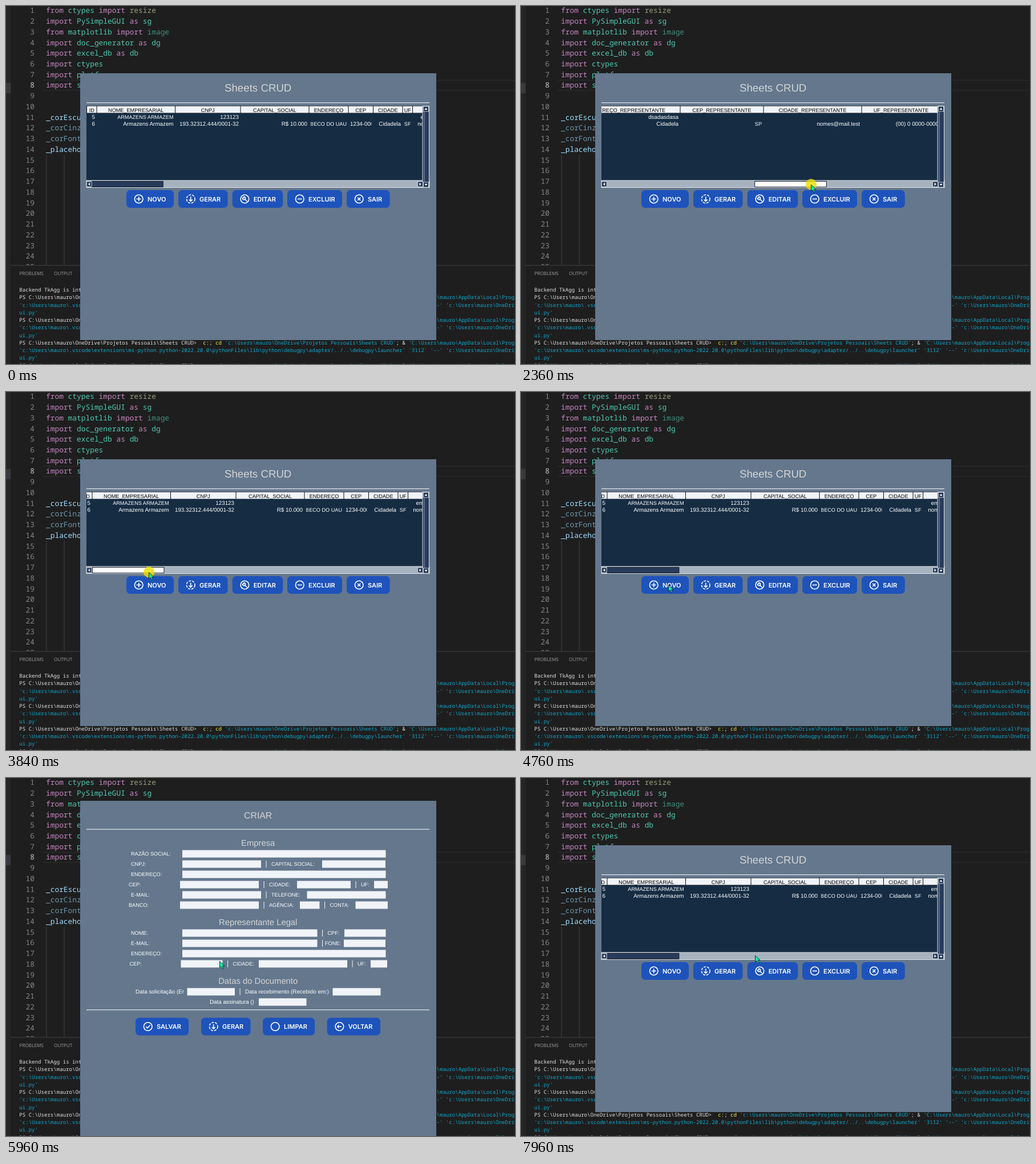
Write an HTML page that moves like this. It is 892x628 px and loops after 8 s.

```html
<!DOCTYPE html>
<html lang="pt">
<head>
<meta charset="utf-8">
<style>
html, body { margin: 0; width: 100%; height: 100%; overflow: hidden; background: #1e1e1e; }
svg { display: block; }
text { white-space: pre; text-rendering: geometricPrecision; }
.code { font: 12.87px "Noto Sans Mono", monospace; }
.term { font: 9.11px "Noto Sans Mono", monospace; fill: #e0e0e0; }
.tab { font: 8.2px "Open Sans", sans-serif; fill: #a0a0a0; }
.ui { font-family: "Liberation Sans", Arial, sans-serif; }
.btn { font: 600 11px Inter, sans-serif; fill: #fff; }
.icon { fill: none; stroke: #fff; stroke-width: 1.6; }
</style>
</head>
<body>
<svg id="stage" width="892" height="628" viewBox="0 0 892 628"></svg>
<script>
const LOOP = 8000, NAVY = '#283b5b', PANEL = '#64778d', PAPER = '#f0f3f8', RULE = '#dce0e4';
const PER_THUMB_PX = 4.68;

const rect = (x, y, w, h, fill, more = '') =>
  `<rect x="${x}" y="${y}" width="${w}" height="${h}" fill="${fill}" ${more}/>`;
const text = (x, y, s, more = '') => `<text x="${x}" y="${y}" ${more}>${s}</text>`;
const span = (color, s) => `<tspan fill="${color}">${s}</tspan>`;
const label = (x, y, s, fill = '#fff', anchor = 'start') =>
  text(x, y, s, `class="ui" fill="${fill}" text-anchor="${anchor}"
    font-size="${/[A-Z]{2}/.test(s) ? 9.15 : 9.8}"`);
const heading = (y, s, size) =>
  text(441.7, y, s, `class="ui" fill="#d4d4d4" font-size="${size}" text-anchor="middle"`);
const rule = y => rect(141, y, 601, 1.3, RULE);

// Editor and terminal behind the window
function editor() {
  const key = s => span('#c586c0', s), mod = s => span('#4ec9b0', s);
  const lines = [
    `${key('from')} ${mod('ctypes')} ${key('import')} ${span('#9d9d7e', 'resize')}`,
    `${key('import')} ${mod('PySimpleGUI')} ${key('as')} ${mod('sg')}`,
    `${key('from')} ${mod('matplotlib')} ${key('import')} ${span('#3e9080', 'image')}`,
    `${key('import')} ${mod('doc_generator')} ${key('as')} ${mod('dg')}`,
    `${key('import')} ${mod('excel_db')} ${key('as')} ${mod('db')}`,
    ...['ctypes', 'platform', 'sys'].map(m => `${key('import')} ${mod(m)}`),
    '', '',
    span('#9cdcfe', '_corEscura'), span('#6d96ab', '_corCinza'),
    span('#6d96ab', '_corFonte'), span('#9cdcfe', '_placeholder'),
  ];
  let out = rect(0, 0, 8, 628, '#252526') + rect(0, 135, 8, 18, '#3a3a3e') +
    rect(64, 129.5, 828, 1.3, '#2b2b2b') + rect(64, 147.5, 828, 1.3, '#2b2b2b') +
    rect(70.5, 261, 1, 194, '#404040') + rect(101.5, 261, 1, 194, '#404040');
  for (let i = 0; i < 25; i++) {
    const y = 12.3 + i * 18.74;
    out += text(50, y, i + 1, `class="code" text-anchor="end" fill="${i == 7 ? '#c6c6c6' : '#858585'}"`);
    if (lines[i]) out += text(70, y, lines[i], 'class="code"');
  }
  return out;
}

function terminal() {
  const blue = s => span('#11a8cd', s), yellow = s => span('#f0f04a', s);
  const home = String.raw`:\Users\mauro`, project = String.raw`${home}\OneDrive\Projetos Pessoais\Sheets CRUD`;
  const command = [
    `PS C${project}&gt;  ${yellow('c:')}; ${yellow('cd')} ${blue(`'c${project}'`)}; &amp; ` +
      blue(String.raw`'C${home}\AppData\Local\Programs'`),
    blue(String.raw`'c${home}\.vscode\extensions\ms-python.python-2022.20.0\pythonFiles\lib\python\debugpy\adapter/../..\debugpy\launcher' '3112' '--' 'c${home}\OneDrive`),
    blue("ui.py'"),
  ];
  const lines = ['Backend TkAgg is interactive', ...command, ...command, ...command, command[0]];
  return rect(8, 454.5, 884, 174, '#1e1e1e') + rect(8, 454.5, 884, 1, '#434343') +
    text(23.5, 472, 'PROBLEMS', 'class="tab"') + text(84, 472, 'OUTPUT', 'class="tab"') +
    lines.map((s, i) => text(23.3, 501.2 + i * 13.25, s, 'class="term"')).join('');
}

// Buttons
const icons = {
  NOVO: 'M-4 0H4M0-4V4',
  GERAR: 'M0-4V4M-3 1L0 4 3 1',
  EDITAR: 'M4 4L-.5-.5M-4-1.5A2.6 2.6 0 1 0-1.5-4L-2-2z',
  EXCLUIR: 'M-4 0H4',
  SAIR: 'M-2.5-2.5L2.5 2.5M-2.5 2.5L2.5-2.5',
  SALVAR: 'M-3.5 0L-1 2.5 4-2.5',
  LIMPAR: '',
  VOLTAR: 'M3.5 0H-3.5M-1-2.5L-3.5 0-1 2.5',
};
const button = (x, y, w, name) => `<g id="${name}${y}">` +
  rect(x, y, w, 31, '#1e53bb', 'rx="6.5"') +
  `<g class="icon" transform="translate(${x + 21.7} ${y + 15.5})">
    <circle r="7.3" ${name == 'GERAR' ? 'stroke-dasharray="4.2 1.9"' : ''}/><path d="${icons[name]}"/></g>` +
  text(x + 37, y + 19.6, name, 'class="btn"') + '</g>';

// List window: columns are [title, width, first row, second row]
const columns = [
  ['ID', 17.5, '5', '6'],
  ['NOME_EMPRESARIAL', 137.5, 'ARMAZENS ARMAZEM', 'Armazens Armazem'],
  ['CNPJ', 114.5, '123123', '193.32312.444/0001-32'],
  ['CAPITAL_SOCIAL', 120, '', 'R$ 10.000'],
  ['ENDEREÇO', 69, '', 'BECO DO UAU'],
  ['CEP', 43.5, '', '1234-000'],
  ['CIDADE', 51.5, '', 'Cidadela'],
  ['UF', 17.5, '', 'SF'],
  ['E-MAIL', 87.5, 'emite@mail.test', 'nomes@mail.test'],
  ['TELEFONE', 92, '', '(00) 0 0000-0000'],
  ['BANCO', 60, '', '123'],
  ['AGENCIA', 65, '', '1234'],
  ['CONTA', 55, '', '12345-6'],
  ['REPRESENTANTE', 130, '', 'Representante'],
  ['CPF', 106, '', '123.123.123-12'],
  ['ENDEREÇO_REPRESENTANTE', 188, 'dsadasdasa', 'Cidadela'],
  ['CEP_REPRESENTANTE', 146, '', 'SP'],
  ['CIDADE_REPRESENTANTE', 172, '', 'nomes@mail.test'],
  ['UF_REPRESENTANTE', 138, '', '(00) 0 0000-0000'],
  ['EMAIL_REPRESENTANTE', 158, '', ''],
  ['FONE_REPRESENTANTE', 156, '', ''],
  ['DATA_SOLICITACAO', 140, '', ''],
  ['DATA_RECEBIMENTO', 140, '', ''],
  ['DATA_ASSINATURA', 140, '', ''],
  ['ARQUIVO', 140, '', ''],
];

function table() {
  let x = .5, out = rect(0, 0, 2690, 13, '#0a0f16');
  for (const [title, w, ...rows] of columns) {
    out += rect(x + .5, .7, w - 1, 11.8, PAPER) + label(x + w / 2, 10.5, title, '#000', 'middle');
    rows.forEach((s, i) => {
      const inner = w - 6, fits = s.length * 5 < inner;
      out += `<svg x="${x + 3}" y="${13 + i * 11.7}" width="${inner}" height="13">` +
        label(fits ? inner : 0, 10.3, s, '#fff', fits ? 'end' : 'start') + '</svg>';
    });
    x += w;
  }
  return `<svg x="141" y="175" width="590" height="131">${rect(0, 0, 590, 131, '#152c43')}<g id="rows">${out}</g></svg>`;
}

const arrowBox = (x, y, turn) => `<g transform="translate(${x} ${y}) rotate(${turn})">` +
  rect(-4.5, -4.5, 9, 9, NAVY, `stroke="${RULE}" stroke-width=".8"`) + '<path d="M-2.5 1.5L0-1.8 2.5 1.5z" fill="#fff"/></g>';

const listWindow = () => rect(130, 118, 624, 468, PANEL) + heading(150, 'Sheets CRUD', 18.7) + rule(169) + table() +
  rect(141, 306, 601, 12.5, '#a6b2be', `stroke="${RULE}"`) +
  rect(730, 175.5, 11.5, 143, NAVY, `stroke="${RULE}"`) + rect(732.5, 186, 1, 122, '#8d9bb0') +
  '<rect id="thumb" y="307.5" width="125.5" height="10" stroke="#111a28"/>' +
  arrowBox(145.7, 312.5, -90) + arrowBox(726, 312.5, 90) + arrowBox(736, 180.5, 0) + arrowBox(736, 313.5, 180) +
  button(211, 323, 83, 'NOVO') + button(302, 323, 86.5, 'GERAR') + button(396.7, 323, 88.5, 'EDITAR') +
  button(493, 323, 96, 'EXCLUIR') + button(597, 323, 75.7, 'SAIR');

// Form rows: centre y, first x, then label, field left, field right
const formRows = [
  [133, 219, 'RAZÃO SOCIAL:', 309, 665.5],
  [151, 219, 'CNPJ:', 309, 447, 'CAPITAL SOCIAL:', 554, 665],
  [169, 219, 'ENDEREÇO:', 309, 665.5],
  [187, 215, 'CEP:', 305, 443, 'CIDADE:', 510, 604, 'UF:', 645, 669],
  [205, 219, 'E-MAIL:', 309, 447, 'TELEFONE:', 527.5, 665.5],
  [223, 215, 'BANCO:', 305, 443, 'AGÊNCIA:', 515, 549.5, 'CONTA:', 612.5, 669],
  [272, 219, 'NOME:', 309, 545.5, 'CPF:', 593, 665.5],
  [290, 219, 'E-MAIL:', 309, 545.5, '', 592, 665],
  [308, 219, 'ENDEREÇO:', 309, 665.5],
  [326, 216.5, 'CEP:', 306.5, 379.5, 'CIDADE:', 443, 598, 'UF:', 639, 668],
  [375, 227, 'Data solicitação (Er', 317.5, 401, 'Data recebimento (Recebido em:)', 572.5, 656.5],
  [393, 357, 'Data assinatura ()', 443, 526.5],
];

function formRow([y, x, ...cells]) {
  let out = '';
  for (let i = 0; i < cells.length; i += 3) {
    const [name, left, right] = cells.slice(i, i + 3);
    if (i) out += rect(x - 9.5, y - 6, 1.1, 12, '#e8ebee');
    out += label(x, y + 3.4, name) + rect(left, y - 6.5, right - left, 13, PAPER);
    x = right + 18;
  }
  return out;
}

const formWindow = () => rect(130, 40, 624, 588, PANEL) + heading(71, 'CRIAR', 15.8) + rule(89.3) +
  heading(118.7, 'Empresa', 14.8) + heading(257.7, 'Representante Legal', 14.8) +
  heading(360.5, 'Datas do Documento', 14.8) + formRows.map(formRow).join('') + label(559, 293.4, 'FONE:') + rule(406) +
  button(227, 420.5, 93, 'SALVAR') + button(342, 420.5, 86.5, 'GERAR') +
  button(450, 420.5, 91, 'LIMPAR') + button(562.7, 420.5, 93.3, 'VOLTAR');

stage.innerHTML = editor() + terminal() +
  `<g id="list">${listWindow()}</g><g id="form">${formWindow()}</g>
  <g id="pointer"><circle id="halo" cx=".5" r="9.7" fill="#e8de00"/>
  <path d="M.5.5V12L3.2 9.6 5.2 13.8 7.3 12.8 5.4 8.8H9.2z" fill="#12f0a6" stroke="#10242c" stroke-width=".9"/></g>`;

// The picture updates in bursts: [start, count], 120 ms apart
const ticks = [[0, 1], [400, 3], [800, 3], [1200, 2], [1600, 3], [2000, 4], [2760, 1], [2920, 2], [3200, 3], [3720, 3],
  [4120, 3], [4640, 2], [4920, 1], [5200, 4], [5720, 3], [6120, 3], [6520, 2], [7160, 1], [7320, 1], [7560, 1], [7720, 3]]
  .flatMap(([start, n]) => Array.from({ length: n }, (_, i) => start + i * 120));

// Pointer path: time, x, y, thumb offset
const path = [
  [400, 749, 598, 0], [640, 343, 414, 0], [1040, 247, 322, 0], [1200, 249, 318, 0], [1320, 251, 314, 0],
  [1720, 251, 314, 0], [1840, 272, 314, 22], [2360, 508, 313, 260], [2760, 500, 317, 250], [2920, 470, 319, 220],
  [3440, 300, 318, 50], [3720, 256, 316, 6], [3840, 250, 316, 1.7], [3960, 250, 316, 1.7], [4360, 258, 338, 1.7],
  [4920, 258, 338, 1.7], [5320, 292, 352, 1.7], [5560, 314, 342, 1.7], [5840, 355, 315, 1.7], [5960, 374, 321, 1.7],
  [6360, 560, 415, 1.7], [6640, 589, 431, 1.7], [7320, 589, 431, 1.7], [7560, 573, 416, 1.7], [7960, 410, 311, 1.7],
];
const presses = [[1600, 4120, .8], [4640, 4760, .62], [7160, 7320, .62]];

function poseAt(t) {
  const i = Math.max(1, path.findIndex(p => p[0] >= t)), a = path[i - 1], b = path[i];
  const k = Math.max(0, (t - a[0]) / (b[0] - a[0]));
  return a.map((v, j) => v + (b[j] - v) * k).slice(1);
}

const byId = id => document.getElementById(id);
const set = (id, name, value) => byId(id).setAttribute(name, value);
const show = (id, on) => { byId(id).style.display = on ? '' : 'none'; };

function draw(now) {
  const t = ticks.findLast(k => k <= now % LOOP);
  const [x, y, offset] = poseAt(t);
  const press = presses.find(([from, to]) => t >= from && t < to);
  const form = t >= 4920 && t < 7320;
  show('list', !form);
  show('form', form);
  show('pointer', t >= 400);
  set('pointer', 'transform', `translate(${x} ${y})`);
  set('halo', 'opacity', press ? press[2] : 0);
  set('rows', 'transform', `translate(${-Math.round(offset * PER_THUMB_PX)} 0)`);
  set('thumb', 'x', 149.7 + offset);
  set('thumb', 'fill', t >= 1320 && t < 4240 ? '#fff' : NAVY);
  set('NOVO323', 'transform', t == 4640 ? 'translate(1 1)' : '');
  set('VOLTAR420.5', 'transform', t == 7160 ? 'translate(1 1)' : '');
  requestAnimationFrame(() => draw(performance.now()));
}
draw(0);
</script>
</body>
</html>
```
